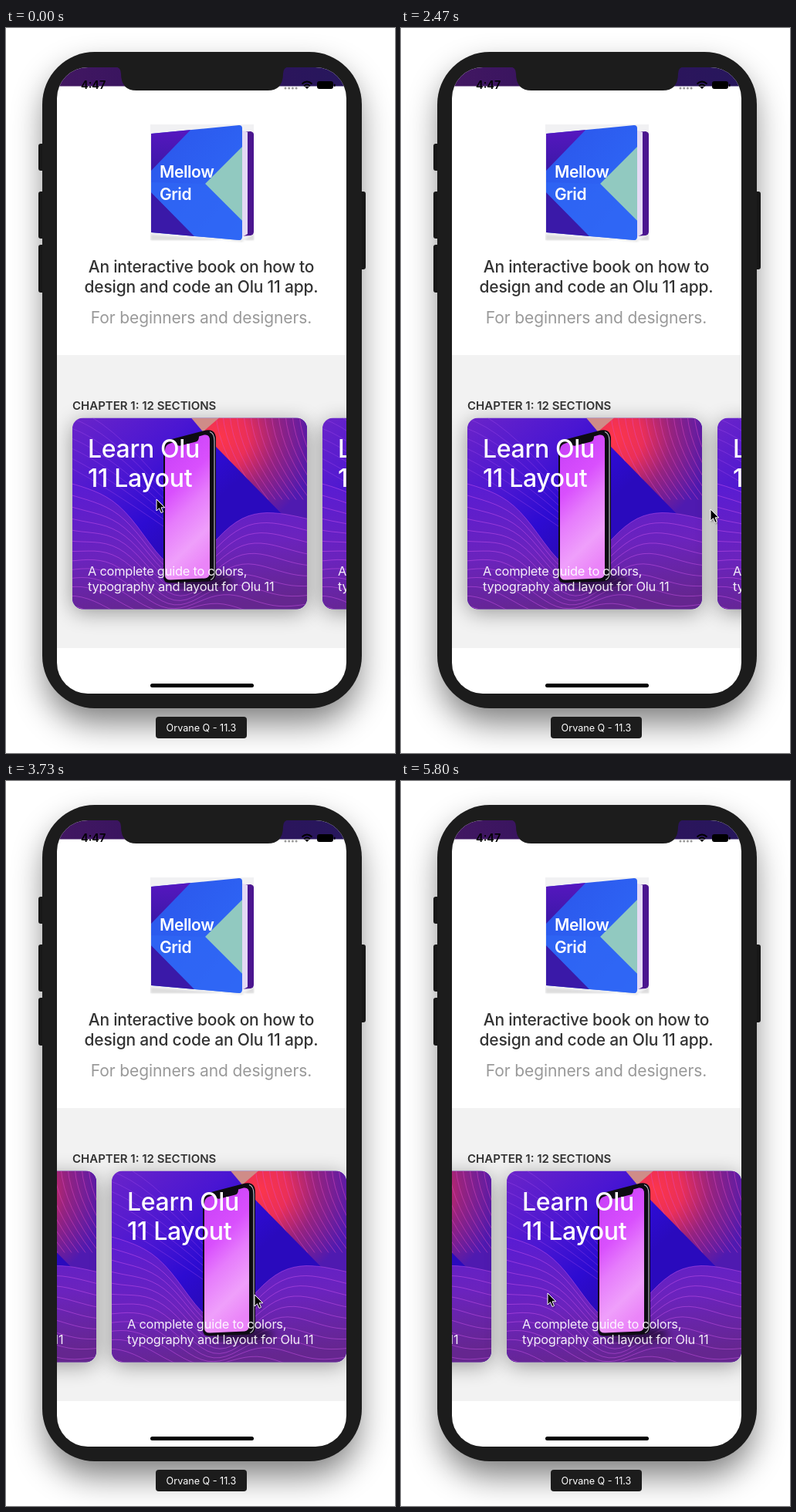
An HTML page that plays this animation: 504 px wide and 940 px high, repeating every 6.27 s.

```html
<!DOCTYPE html>
<html lang="en">
<head>
<meta charset="utf-8">
<title>Card scroller</title>
<style>
html, body { margin: 0; width: 100%; height: 100%; overflow: hidden; background: #fff; }
svg { display: block; }
text { font-family: Inter, "Liberation Sans", sans-serif; }
.lead { font-size: 21px; font-weight: 500; fill: #333; text-anchor: middle; letter-spacing: -.01em; }
.sub { font-weight: 400; fill: #999; letter-spacing: -.006em; }
.title { font-size: 32px; font-weight: 500; fill: #fff; letter-spacing: -.01em; }
.note { font-size: 16.4px; fill: #fff; fill-opacity: .92; letter-spacing: -.014em; }
.book { font-size: 21px; font-weight: 600; fill: #fff; letter-spacing: -.02em; }
</style>
</head>
<body>
<svg width="504" height="940" viewBox="0 0 504 940">
<defs>
  <filter id="far" x="-30%" y="-20%" width="160%" height="140%"><feGaussianBlur stdDeviation="22"/></filter>
  <filter id="soft" x="-30%" y="-30%" width="160%" height="160%"><feGaussianBlur stdDeviation="14"/></filter>
  <filter id="near" x="-50%" y="-150%" width="200%" height="400%"><feGaussianBlur stdDeviation="6"/></filter>
  <filter id="tiny" x="-50%" y="-50%" width="200%" height="200%"><feGaussianBlur stdDeviation="1"/></filter>
  <clipPath id="screen"><rect x="66" y="51" width="375" height="812" rx="40"/></clipPath>
  <clipPath id="round"><rect width="304" height="248" rx="14"/></clipPath>
  <clipPath id="corner"><path id="cornerArea" d="M168 19L190 0H304V158Z"/></clipPath>
  <clipPath id="face"><path d="M188 137L302 126Q306 126 306 130V270Q306 275 302 275L188 265Z"/></clipPath>
  <linearGradient id="strip"><stop stop-color="#421762"/><stop offset=".5" stop-color="#30125c"/><stop offset="1" stop-color="#27175c"/></linearGradient>
  <linearGradient id="sky" x1="0" y1="0" x2=".55" y2=".5">
    <stop stop-color="#6a24c9"/><stop offset=".5" stop-color="#4a16d2"/><stop offset=".8" stop-color="#2d0bd2"/><stop offset="1" stop-color="#2a0abd"/>
  </linearGradient>
  <linearGradient id="hill" x1=".2" y1="0" x2=".4" y2="1"><stop stop-color="#5a1cd2"/><stop offset=".55" stop-color="#6b23bd"/><stop offset="1" stop-color="#65268f"/></linearGradient>
  <radialGradient id="flame" gradientUnits="userSpaceOnUse" cx="190" cy="26" r="125">
    <stop stop-color="#fd364a"/><stop offset=".3" stop-color="#ea2f58"/><stop offset=".6" stop-color="#96237f"/><stop offset="1" stop-color="#4f1ab0"/>
  </radialGradient>
  <linearGradient id="glass" x1=".2" y1="0" x2=".5" y2="1">
    <stop stop-color="#c83ff8"/><stop offset=".35" stop-color="#d950fd"/><stop offset=".55" stop-color="#e67cfc"/><stop offset=".8" stop-color="#ef9ffb"/><stop offset="1" stop-color="#ea84f8"/>
  </linearGradient>
  <linearGradient id="cover" x1="0" y1="0" x2="0" y2="1"><stop stop-color="#5a17c3"/><stop offset="1" stop-color="#3a18a6"/></linearGradient>
  <linearGradient id="beam" x1="0" y1="0" x2="1" y2="1"><stop stop-color="#2b55ea"/><stop offset="1" stop-color="#2f6cfa"/></linearGradient>

  <g id="card">
    <rect y="6" width="304" height="246" rx="14" opacity=".38" filter="url(#soft)"/>
    <g clip-path="url(#round)">
      <rect width="304" height="248" fill="url(#sky)"/>
      <path id="slope" fill="none" stroke="#a952ee" stroke-width=".7" opacity=".5"/>
      <path d="M154 0H194L170 19Z" fill="#cf8c88"/>
      <use href="#cornerArea" fill="url(#flame)"/>
      <path id="rays" clip-path="url(#corner)" fill="none" stroke="#e04ac4" stroke-width=".8" opacity=".6"/>
      <path id="ground" fill="url(#hill)"/>
      <path id="waves" fill="none" stroke="#d75bf0" stroke-width=".8" opacity=".55"/>
      <ellipse cx="168" cy="212" rx="42" ry="10" opacity=".6" filter="url(#near)"/>
      <path d="M118 40Q118 30 127 28L173 16Q186 14 186 28V203Q186 211 177 212L126 214Q118 214 118 206Z" fill="#0d0b12"/>
      <path d="M178 18Q184 20 184 30V202Q184 208 179 210" fill="none" stroke="#b9b5c2" stroke-width="1.2"/>
      <path d="M120 42Q120 35 127 33L133 31Q135 37 140 36L160 31Q164 30 164 24L171 22Q178 21 178 29V201Q178 207 172 208L127 210Q120 210 120 204Z" fill="url(#glass)"/>
    </g>
    <text class="title" x="20" y="51">Learn Olu</text>
    <text class="title" x="20" y="89">11 Layout</text>
    <text class="note" x="20" y="204">A complete guide to colors,</text>
    <text class="note" x="20" y="224">typography and layout for Olu 11</text>
  </g>
</defs>

<rect width="504" height="940" fill="#fff"/>
<rect x="52" y="54" width="404" height="846" rx="62" opacity=".52" filter="url(#far)"/>
<path d="M45 150h4v35h-4q-3 0-3-3v-29q0-3 3-3zM45 212h4v61h-4q-3 0-3-3v-55q0-3 3-3zM45 281h4v62h-4q-3 0-3-3v-56q0-3 3-3zM459 212h4q3 0 3 3v95q0 3-3 3h-4z" fill="#171717"/>
<rect x="47" y="31" width="414" height="851" rx="68" fill="#1c1c1c"/>

<g clip-path="url(#screen)">
  <rect x="66" y="51" width="375" height="812" fill="#fff"/>
  <rect x="66" y="51" width="375" height="24.5" fill="url(#strip)"/>
  <text x="97" y="79" font-size="14.5" font-weight="600">4:47</text>
  <path d="M362 78h15" stroke="#999" stroke-width="3" stroke-linecap="round" stroke-dasharray="0 4.7"/>
  <g fill="none" stroke="#000" stroke-width="2"><path d="M383.5 72.5q6.5-6 13 0M386 75.3q4-3.6 8 0"/><path d="M388 76.5h4l-2 2z" fill="#000" stroke-width="1"/></g>
  <rect x="403" y="69" width="21" height="10" rx="3"/><rect x="425" y="72.5" width="1.5" height="3.5" rx=".7"/>

  <rect x="187" y="125" width="134" height="150" fill="#f1f1f3"/>
  <path d="M188 268L306 277 321 267V275H188Z" fill="#ddd" filter="url(#tiny)"/>
  <path d="M304 135L317 134Q321 135 321 138V264Q321 268 317 269L304 270Z" fill="#4b168f"/>
  <path d="M304 132L313 135V267L304 272Z" fill="#e4daf4"/>
  <g clip-path="url(#face)">
    <rect x="187" y="125" width="120" height="151" fill="url(#beam)"/>
    <path d="M187 125H246L187 186Z" fill="url(#cover)"/>
    <path d="M187 212L250 276H187Z" fill="#3a19a8"/>
    <path d="M306 154L258 202 306 250Z" fill="#91c9c0"/>
    <path d="M258 202L306 250V276H250L187 212V200Z" fill="#2f66f5" opacity=".75"/>
  </g>
  <text class="book" x="199" y="194">Mellow</text>
  <text class="book" x="199" y="223">Grid</text>

  <text class="lead" x="253" y="317">An interactive book on how to</text>
  <text class="lead" x="253" y="343">design and code an Olu 11 app.</text>
  <text class="lead sub" x="253" y="383">For beginners and designers.</text>
  <rect x="66" y="424" width="375" height="380" fill="#f2f2f2"/>
  <text x="86" y="495" font-size="15" font-weight="600" fill="#333">CHAPTER 1: 12 SECTIONS</text>
  <g id="row"><use href="#card"/><use href="#card" x="324"/></g>
  <rect x="187" y="850" width="134" height="5" rx="2.5"/>
</g>
<path d="M141 50Q149 51 149 59Q149 81 169 81H339Q359 81 359 59Q359 51 367 50Z" fill="#1c1c1c"/>
<rect x="194" y="893" width="118" height="28" rx="4" fill="#1c1c1c"/>
<text x="253" y="912" font-size="12.6" fill="#fff" text-anchor="middle">Orvane Q - 11.3</text>

<g id="cursor">
  <path d="M1 2V17L4.5 13.5 7 19 9.5 18 7 12.5H12Z" opacity=".4" filter="url(#tiny)"/>
  <path d="M0 0V15L3.5 11.7 6 17.5 8.5 16.4 6 10.8H10.8Z" stroke="#fff"/>
</g>
</svg>
<script>
const $ = id => document.getElementById(id);
const LOOP = 6270, STEP = 1000 / 15, END = 273, WIDTH = 375;

// Contour lines of the card artwork: a valley behind the phone, flatter further down
const wave = i => {
  const pts = [];
  for (let x = -4; x <= 308; x += 8) {
    const y = 85 + 14 * i + (90 - 8 * i) * Math.exp(-(((x - 135) / 60) ** 2))
      + .15 * x + (2 + i * .6) * Math.sin(x / 24 + i * .4);
    pts.push(x + " " + y.toFixed(1));
  }
  return "M" + pts.join("L");
};
const lines = (n, make) => Array.from({ length: n }, (_, i) => make(i)).join("");
$("ground").setAttribute("d", wave(0) + "V250H-4Z");
$("waves").setAttribute("d", lines(13, wave));
$("slope").setAttribute("d", lines(7, i => `M0 ${i * 13 - 12}q45 ${12 + i * 2} 120 ${100 - i * 4}`));
$("rays").setAttribute("d", lines(16, i => `M${186 + i * 9} -4q4 50 50 110`));

// Motion
const unit = (t, a, b) => Math.min(1, Math.max(0, (t - a) / (b - a)));
const ease = (t, a, b) => { const u = unit(t, a, b); return u * u * (3 - 2 * u); };
const mix = (a, b, u) => a + (b - a) * u;
const move = (x1, y1, x2, y2, u) => [mix(x1, x2, u), mix(y1, y2, u)];
const band = d => d * .55 / (d * .55 / WIDTH + 1);
const settle = ms => { const k = ms * .01065; return (1 + k) * Math.exp(-k); };

function scrollAt(t) {
  if (t < 1490) return -band(209 * ease(t, 333, 733));
  if (t < 2507) return -88 * settle(t - 1490);
  if (t < 2990) return 370 * ease(t, 2507, 2990);
  if (t < 3930) return END + 97 * settle(t - 2990);
  if (t < 5090) return END + band(122 * ease(t, 3933, 4333));
  return END + 57 * settle(t - 5090);
}

function cursorAt(t) {
  if (t < 2400) return move(195, 611, 415, 622, ease(t, 333, 733));
  if (t < 2720) return move(415, 622, 90, 670, unit(t, 2400, 2720) ** 2);
  if (t < 3320) return [-60, 689];
  if (t < 3933) return move(0, 689, 322, 666, ease(t, 3333, 3733));
  return move(322, 666, 190, 664, ease(t, 3933, 4333));
}

function draw(now) {
  const t = Math.floor((now % LOOP + 4) / STEP) * STEP;
  $("row").setAttribute("transform", `translate(${86 - Math.round(scrollAt(t))} 505.5)`);
  $("cursor").setAttribute("transform", `translate(${cursorAt(t).map(Math.round)})`);
}
const start = performance.now();
function tick() {
  draw(performance.now() - start);
  requestAnimationFrame(tick);
}
tick();
</script>
</body>
</html>
```
